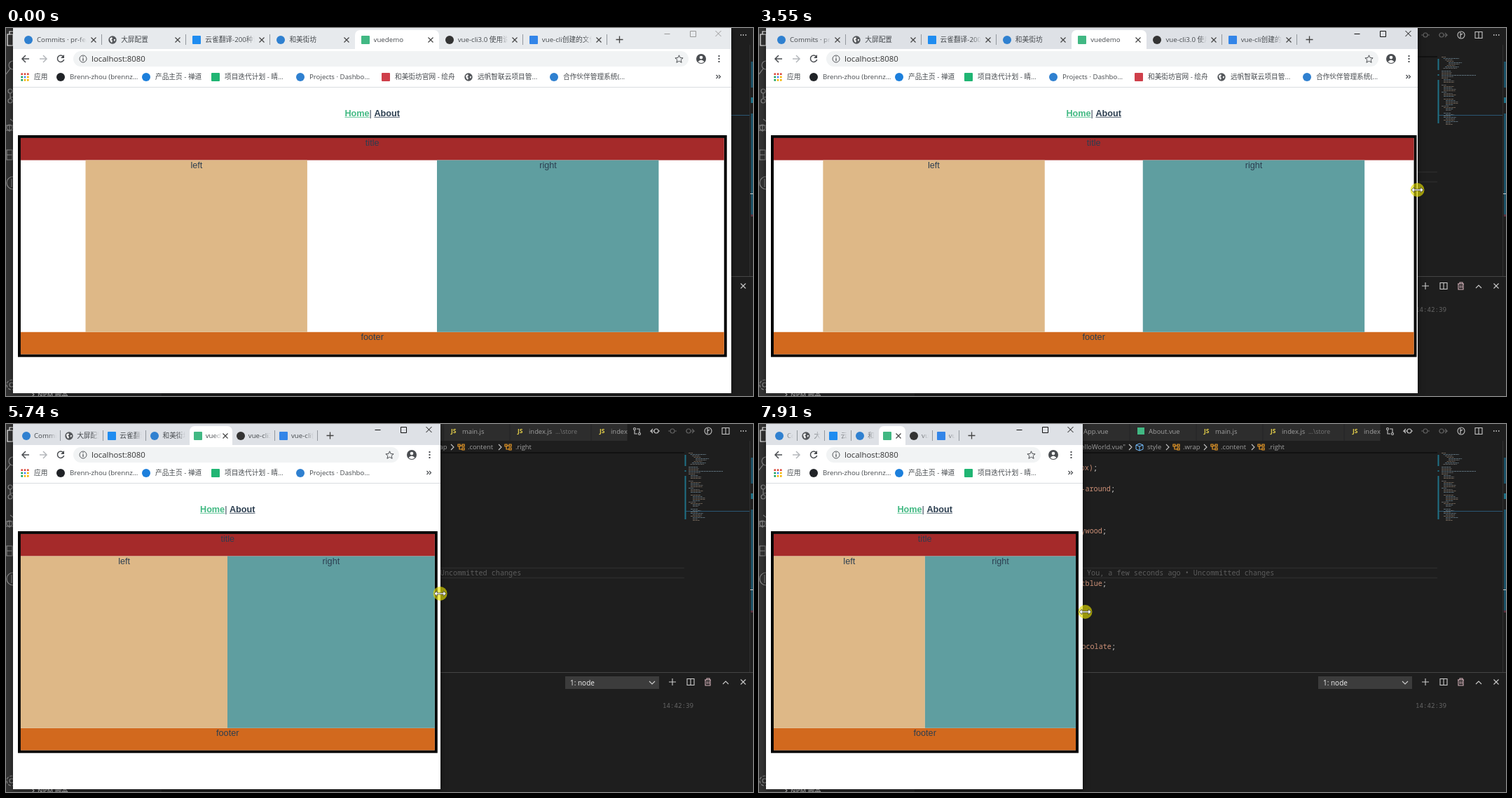
An HTML page for the animation above (8 s loop, 1066 by 525 pixels).

```html
<!DOCTYPE html>
<html lang="zh-CN">
<head>
<meta charset="utf-8">
<title>Resizing a flex layout</title>
<style>
html, body { margin: 0; width: 100%; height: 100%; overflow: hidden; background: #1e1e1e; }
body { font: 9.7px "Open Sans", "Noto Sans CJK SC", "Noto Sans CJK", sans-serif; color: #45494d; }
#stage { position: absolute; left: 0; top: 0; width: 1066px; height: 525px; overflow: hidden; }
#stage > svg { position: absolute; left: 0; top: 0; }
.ui { font: 9.4px "Open Sans", "Noto Sans CJK SC", sans-serif; fill: #a0a0a0; }
.code { font: 10.15px "Noto Sans Mono", "DejaVu Sans Mono", monospace; fill: #ce9178; white-space: pre; }
.line { fill: none; stroke: #c5c5c5; stroke-width: 1.1; }

#win { position: absolute; left: 10px; top: 0; height: 521px; overflow: hidden; background: #fff;
  box-shadow: 0 0 8px rgba(0,0,0,.55); --bar: #e7eaed; --ctl: #999; }
#win.on { --bar: #dee1e6; --ctl: #111; }
#view { position: absolute; left: -10px; top: 0; height: 521px; }
#view > * { position: absolute; }
#strip { left: 0; right: -30px; top: 0; height: 30px; background: var(--bar); }
#tabs { left: 17px; right: 176.5px; top: 3px; height: 27px; display: flex; }
.tab { position: relative; flex: 1 1 0; min-width: 0; display: flex; align-items: center; padding-left: 9px;
  box-sizing: border-box; white-space: nowrap; }
.tab.cur { background: #fff; border-radius: 7px 7px 0 0; }
.tab.bar::after { content: ""; position: absolute; right: 0; top: 6px; width: 1px; height: 15px; background: #92979d; }
.tab span { flex: 1 1 0; min-width: 0; margin-left: 6px; overflow: hidden; line-height: 18px;
  -webkit-mask-image: linear-gradient(to right, #000 calc(100% - 12px), transparent);
  mask-image: linear-gradient(to right, #000 calc(100% - 12px), transparent); }
.tab svg.x { flex: none; width: 10px; height: 10px; margin: 0 7px 0 5px; }
.slim .tab { padding-left: 6px; }
.slim .tab span { margin: 0 6px 0 5px; }
.slim .tab.cur span { margin-right: 0; }
.slim .tab svg.x { display: none; }
.slim .tab.cur svg.x { display: block; margin: 0 5px 0 0; }
.ico { flex: none; width: 12px; height: 12px; background: var(--c); border-radius: 1px; }
.ico.dot { border-radius: 50%; }
svg.ico { background: none; }
#plus { right: 153.5px; top: 11px; }
#pill { left: 96px; right: 60.5px; top: 33px; height: 22px; border-radius: 11px; background: #f1f3f4; }
#url { left: 122px; top: 36px; font-size: 11.4px; line-height: 16px; color: #333; }
#rule { left: 0; right: -30px; top: 84px; height: 1px; background: #dadce0; }
#marks { left: 0; top: 60px; height: 20px; }
.mark { position: absolute; top: 0; height: 20px; display: flex; align-items: center; white-space: nowrap; }
.mark span { position: absolute; left: 19px; line-height: 20px; }
#edge { right: 0; top: 0; }

/* the page is laid out at full size and shown at 0.791 */
#page { --k: .791; left: 16.6px; top: 114.6px; width: calc((100% - 23.1px) / var(--k));
  transform: scale(var(--k)); transform-origin: 0 0; text-align: center; color: #2c3e50;
  font: 16px/18px "Liberation Sans", Arial, sans-serif; }
#nav { height: 48px; white-space: nowrap; }
#nav b { text-decoration: underline; }
#nav b:first-child { color: #42b983; }
#wrap { height: 390px; border: 5px solid #000; }
#head { height: 40px; background: #a52a2a; }
#body { height: 310px; display: flex; justify-content: space-around; }
#body div { width: 400px; background: #deb887; }
#body div + div { background: #5f9ea0; }
#foot { height: 40px; background: #d2691e; }
</style>
</head>
<body>
<div id="stage">
  <svg width="1066" height="525">
    <defs>
      <g id="vue"><rect x="-5" y="-5" width="10" height="10" fill="#41b883"/></g>
      <g id="node" fill="none" stroke="#ee9d28" stroke-width="1.2"><path d="M-4-3h3v3h-3zM-2 0v4h4M-1-1h3M2-3h3v3h-3zM2 2h3v3h-3z"/></g>
      <g id="close"><path d="M-3.5-3.5l7 7M3.5-3.5l-7 7"/></g>
      <g id="split"><path d="M-5-4.500h10v9h-10zM0-4.500v9"/></g>
    </defs>
    <rect width="47" height="525" fill="#333"/>
    <rect x="38" width="184" height="525" fill="#252526"/>
    <g class="line" stroke-width="1.5" style="stroke:#8a8a8a">
      <path d="M2 9h8v16h-8zM5 9V5h8" style="stroke:#fff"/>
      <circle cx="10" cy="53" r="6"/><path d="M6 58l-6 8"/>
      <circle cx="6" cy="90" r="3"/><circle cx="6" cy="104" r="3"/><path d="M6 93v8M6 99q6 0 8-4"/>
      <circle cx="5" cy="142" r="4"/><path d="M0 139h10M0 146h10M5 138v10M6 130l8 6"/>
      <path d="M1 174h8v14h-8zM1 181h8"/>
      <circle cx="10" cy="221" r="9"/><path d="M8 215v12"/>
      <circle cx="8" cy="509" r="7" stroke-dasharray="4 2"/><circle cx="8" cy="509" r="3"/>
    </g>
    <path class="line" d="M37 520l3 3-3 3"/>
    <text class="ui" x="45" y="526" style="font-weight:700">NPM 脚本</text>

    <rect x="222" width="844" height="24" fill="#252526"/>
    <path d="M222 0h664v24h-664z" fill="#2d2d2d"/>
    <path d="M529 0v24M624 0v24M719 0v24M835 0v24" stroke="#252526"/>
    <g class="ui">
      <text x="463" y="14">App.vue</text>
      <use href="#vue" x="545" y="10"/><text x="556" y="14">About.vue</text>
      <text x="651" y="14">main.js</text><text x="746" y="14">index.js</text>
      <text x="784" y="14" fill="#777" font-size="8.800">...\store</text>
      <text x="863" y="14">index</text>
      <g fill="#e5d04a" font-weight="700" font-size="8.500"><text x="635" y="13">JS</text><text x="730" y="13">JS</text><text x="847" y="13">JS</text></g>
      <rect x="887" width="179" height="24" fill="#1e1e1e"/>
      <text x="523" y="36" text-anchor="end">"HelloWorld.vue"</text>
      <text x="554" y="36">style</text><text x="605" y="36">.wrap</text>
      <text x="659" y="36">.content</text><text x="727" y="36">.right</text>
    </g>
    <path class="line" d="M528 29l4 4-4 4M581 29l4 4-4 4M635 29l4 4-4 4M703 29l4 4-4 4"/>
    <path d="M538 30l5-2 5 2v6l-5 2-5-2zM538 30l5 2 5-2M543 32v6" fill="none" stroke="#75beff"/>
    <use href="#node" x="595" y="32"/><use href="#node" x="649" y="32"/><use href="#node" x="716" y="32"/>
    <path d="M222 41h746" stroke="#111" stroke-width="2"/>

    <g class="line">
      <circle cx="897" cy="7" r="1.500"/><circle cx="904" cy="14" r="1.500"/><path d="M897 9v5h4M904 12V7h-4"/>
      <circle cx="928" cy="10" r="3"/><path d="M931 10h2M925 10h-5l3-3m-3 3l3 3"/>
      <g opacity=".4"><circle cx="951" cy="10" r="3"/><path d="M945 10h3M954 10h3"/>
        <circle cx="974" cy="10" r="3"/><path d="M970 10h1M977 10h5l-3-3m3 3l-3 3"/></g>
      <circle cx="1002" cy="10" r="5"/><path d="M1001 6v8M1001 10l3-2"/>
      <use href="#split" x="1027" y="10"/>
    </g>
    <path d="M1048 10h1.500m2 0h1.500m2 0h1.500" stroke="#ddd" stroke-width="1.500"/>

    <path d="M222 205.500h746M222 219.500h746" stroke="#2b2b2b" stroke-width="1.500"/>
    <g class="code" id="code"></g>
    <g id="map"></g>
    <path d="M970 124.500h92" stroke="#2b5774"/>
    <path d="M969.500 44v16M969.500 66v2M969.500 74v62" stroke="#1f7186" stroke-width="2"/>
    <path d="M1061.500 24v330" stroke="#303030"/>
    <path d="M1064.500 48v37M1064.500 122v144" stroke="#1b5268" stroke-width="3"/>
    <path d="M1064.500 99v8" stroke="#1d7187" stroke-width="3"/>
    <path d="M1064.500 266v3" stroke="#5a3040" stroke-width="3"/>
    <path d="M1062 236.500h4" stroke="#ccc"/>

    <path d="M222 354.500h844" stroke="#454545"/>
    <rect x="798" y="360" width="134" height="18" fill="#3c3c3c"/>
    <text class="ui" x="805" y="373" style="fill:#f0f0f0;font-size:10px">1: node</text>
    <g class="line" style="stroke:#ccc">
      <path d="M918 367l4 4 4-4M946 368h10M951 363v10"/>
      <use href="#split" x="977" y="368"/>
      <path d="M997 365h9M1000 365v-2h4v2M998 365v8h7v-8M1000.500 367v4M1003 367v4" stroke="#d8b5bd"/>
      <path d="M1023 371l4-4 4 4"/><use href="#close" x="1052" y="368"/>
    </g>
    <text class="code" x="937" y="405" style="font-size:9.200px;fill:#666">14:42:39</text>
  </svg>

  <div id="win"><div id="view">
    <div id="strip"></div>
    <div id="tabs"></div>
    <svg id="plus" width="11" height="11"><path d="M0.500 5.500h10M5.500.5v10" stroke="#444" stroke-width="1.300"/></svg>
    <svg width="120" height="60" style="left:0;top:0" fill="none" stroke="#4a4d51" stroke-width="1.500">
      <path d="M33 44H23M28 39l-5 5 5 5"/>
      <path d="M48 44h10M53 39l5 5-5 5" stroke="#b5b8bc"/>
      <path d="M82 41a4.700 4.700 0 1 0 .7 4"/><path d="M83 38v5h-5z" fill="#4a4d51" stroke="none"/>
    </svg>
    <div id="pill"></div>
    <svg width="120" height="60" style="left:0;top:0" fill="none" stroke="#55585c"><circle cx="110" cy="44" r="5"/><path d="M110 43v4M110 40.500v1.200" stroke-width="1.300"/></svg>
    <div id="url">localhost:8080</div>
    <div id="marks"></div>
    <div id="rule"></div>
    <svg id="edge" width="120" height="84" fill="none" stroke="#4a4d51">
      <path d="M24.500 8.500h8M61.500 4.500h8v8h-8zM97.500 4l8 8M105.500 4l-8 8" style="stroke:var(--ctl)"/>
      <path d="M45.500 38.800l1.600 3.700 4 .3-3 2.600 1 3.900-3.600-2.100-3.600 2.100 1-3.900-3-2.600 4-.3z"/>
      <circle cx="77" cy="44" r="7" fill="#4a4d51" stroke="none"/>
      <circle cx="77" cy="42" r="2.300" fill="#fff" stroke="none"/><path d="M72.500 48q4.500-5 9 0-4.500 4-9 0z" fill="#fff" stroke="none"/>
      <path d="M102.500 39v2m0 2v2m0 2v2" stroke-width="2"/>
      <path d="M98.500 67l2.500 2.500-2.500 2.500M102 67l2.500 2.500-2.500 2.500" stroke-width="1.200"/>
    </svg>
    <div id="page">
      <div id="nav"><b>Home</b>| <b>About</b></div>
      <div id="wrap">
        <div id="head">title</div>
        <div id="body"><div>left</div><div>right</div></div>
        <div id="foot">footer</div>
      </div>
    </div>
  </div></div>

  <svg width="1066" height="525">
    <path id="arrow" d="M0 0v13l3-2.700 2 4.500 2-.9-2-4.300h4z" fill="#fff" stroke="#000" stroke-width=".8"/>
    <g id="size">
      <circle id="glow" r="10" fill="rgb(228,222,0)" fill-opacity=".64"/>
      <path d="M-8.500 0l4-3.800v2.800h9v-2.800l4 3.800-4 3.800V1h-9v2.800z" fill="#fff" stroke="#333" stroke-width=".7"/>
    </g>
  </svg>
</div>

<script>
const $ = id => document.getElementById(id);
const BLUE = '#2f80d0', GLOBE = 'globe', APPS = 'apps';
const LOOP = 8000, GRAB = 2600;

function icon(kind, square) {
  if (kind === GLOBE) return '<svg class="ico" viewBox="-6 -6 12 12"><circle r="5.7" fill="#55585c"/>' +
    '<path d="M-4-2l3-2 1 2-2 2 2 1-1 3-2-2zM2-1l2 0-1 3-1-1z" fill="#fff"/></svg>';
  if (kind === APPS) return '<svg class="ico" viewBox="0 0 12 12">' + [...Array(9).keys()].map(i =>
    `<rect x="${i % 3 * 4.3 + .4}" y="${(i / 3 | 0) * 4.3 + .4}" width="2.6" height="2.6" fill="${
      ['#db4437', '#db4437', '#db4437', '#0f9d58', '#4285f4', '#f4b400', '#0f9d58', '#f4b400', '#f4b400'][i]}"/>`).join('') + '</svg>';
  return `<i class="ico ${square ? '' : 'dot'}" style="--c:${kind}"></i>`;
}

const tabs = [
  ['Commits · pr-feature', BLUE], ['大屏配置', GLOBE], ['云雀翻译-200种语言', '#1f8cf0', 1],
  ['和美街坊', BLUE], ['vuedemo', '#41b883', 1], ['vue-cli3.0 使用说明', '#333'], ['vue-cli创建的文件', '#3385e8', 1]
];
$('tabs').innerHTML = tabs.map(([text, color, square], i) =>
  `<div class="tab ${i === 4 ? 'cur' : i === 3 ? '' : 'bar'}">${icon(color, square)}<span>${text}</span>` +
  '<svg class="x" viewBox="-5 -5 10 10" stroke="#444" stroke-width="1.2"><use href="#close"/></svg></div>').join('');

// icon centre, right end, text, icon
const marks = [
  [27, 60, '应用', APPS], [78, 180, 'Brenn-zhou (brennz...', '#202327'], [200, 280, '产品主页 - 禅道', '#1c7fdc'],
  [299, 397, '项目迭代计划 - 晴...', '#20b573', 1], [420, 521, 'Projects · Dashbo...', BLUE],
  [542, 642, '和美街坊官网 - 绘舟', '#cf3f4a', 1], [660, 757, '远帆智联云项目管...', GLOBE],
  [782, 883, '合作伙伴管理系统(...', BLUE]
];
$('marks').innerHTML = marks.map(([x, , text, color, square]) =>
  `<div class="mark" style="left:${x - 6}px">${icon(color, square)}<span>${text}</span></div>`).join('');
const markEls = [...$('marks').children];

// right end, baseline, value
const code = [[483, 66, 'calc(100vh - 200px)'], [508, 96, 'space-around'], [496, 156, 'burlywood'],
  [496, 231, 'cadetblue'], [509, 321, 'chocolate']];
$('code').innerHTML = code.map(([x, y, s]) =>
  `<text x="${x}" y="${y}" text-anchor="end">${s}<tspan fill="#d4d4d4">;</tspan></text>`).join('') +
  '<text x="468" y="216" style="fill:#5c5c5c">You, a few seconds ago • Uncommitted changes</text>';

let seed = 7;
const rnd = () => (seed = seed * 16807 % 2147483647) / 2147483647;
let rows = '';
for (let i = 0; i < 50; i++) {
  if (i % 10 === 9 && i > 5) continue;
  const top = i < 10;
  const x = 974 + (top ? 2.5 * Math.min(i, 9 - i) : i < 16 ? 0 : 3 * (i % 5 > 0) + 3 * (i > 28 && i % 7 > 1));
  const w = i === 13 ? 49 : 6 + rnd() * (top ? 18 : 13);
  rows += `<path d="M${x} ${41.5 + 2 * i}h${w.toFixed(1)}" stroke="${['#8a7a6a', '#6f8795', '#777'][i % 3]}" stroke-dasharray="3 .6" opacity=".75"/>`;
}
$('map').innerHTML = rows;

// time, window edge, content width, pointer y
const drag = [
  [2600, 1034.5, 1034.5, 221], [2800, 1031, 1032, 222], [3100, 1008, 1011, 226], [3400, 964, 968.5, 230],
  [3550, 940, 944.5, 231], [4260, 821, 826, 235], [4330, 806.5, 812, 235], [5110, 687, 691, 238],
  [5740, 619, 620.5, 242], [5970, 610, 611.5, 245], [6830, 501, 507.5, 262], [7530, 466, 467, 268], [7910, 462, 462.5, 268]
];
// time, x, y
const roam = [[440, 1052, 512], [680, 1049, 352], [830, 1047, 346], [1370, 1031, 224], [1680, 1031, 223], [1910, 1032, 221]];

// start, step, count
const beats = [[0, 0, 1], [440, 80, 4], [830, 77, 8], [1600, 80, 2], [1830, 80, 2], [2220, 0, 1], [2600, 80, 11],
  [3480, 78, 11], [4330, 78, 11], [5190, 78, 11], [6050, 78, 11], [6900, 78.7, 9], [7910, 0, 1]];

// latest beat at or before t; beats fall on whole 10 ms
function snap(t) {
  const [start, step, count] = beats.filter(b => b[0] <= t).pop();
  let last = start;
  for (let i = 1; i < count; i++) {
    const next = start + Math.floor(i * step / 10) * 10;
    if (next <= t) last = next;
  }
  return last;
}

function at(keys, t) {
  const i = keys.findIndex(k => k[0] > t);
  if (i < 0) return keys[keys.length - 1];
  if (i === 0) return keys[0];
  const a = keys[i - 1], b = keys[i], u = (t - a[0]) / (b[0] - a[0]);
  return a.map((v, j) => v + (b[j] - v) * u);
}

const move = (el, x, y) => el.setAttribute('transform', `translate(${x} ${y})`);
const show = (el, on) => el.style.display = on ? '' : 'none';

function draw(time) {
  const t = snap(time);
  const [, edge, width, y] = at(drag, t);
  $('win').style.width = edge - 10 + 'px';
  $('win').classList.toggle('on', t >= GRAB);
  $('view').style.width = width + 'px';
  $('tabs').classList.toggle('slim', (width - 193.5) / 7 < 72);
  markEls.forEach((el, i) => show(el, marks[i][1] <= width - 40));

  const [, ax, ay] = at(roam, t);
  show($('arrow'), t >= 440 && t < 2220);
  move($('arrow'), ax, ay);
  show($('size'), t >= 2220);
  show($('glow'), t >= GRAB);
  move($('size'), edge - .5 + (t > 7500 ? 4 : 0), y);
}

const begin = performance.now();
function tick() {
  draw((performance.now() - begin) % LOOP);
  requestAnimationFrame(tick);
}
tick();
</script>
</body>
</html>
```
